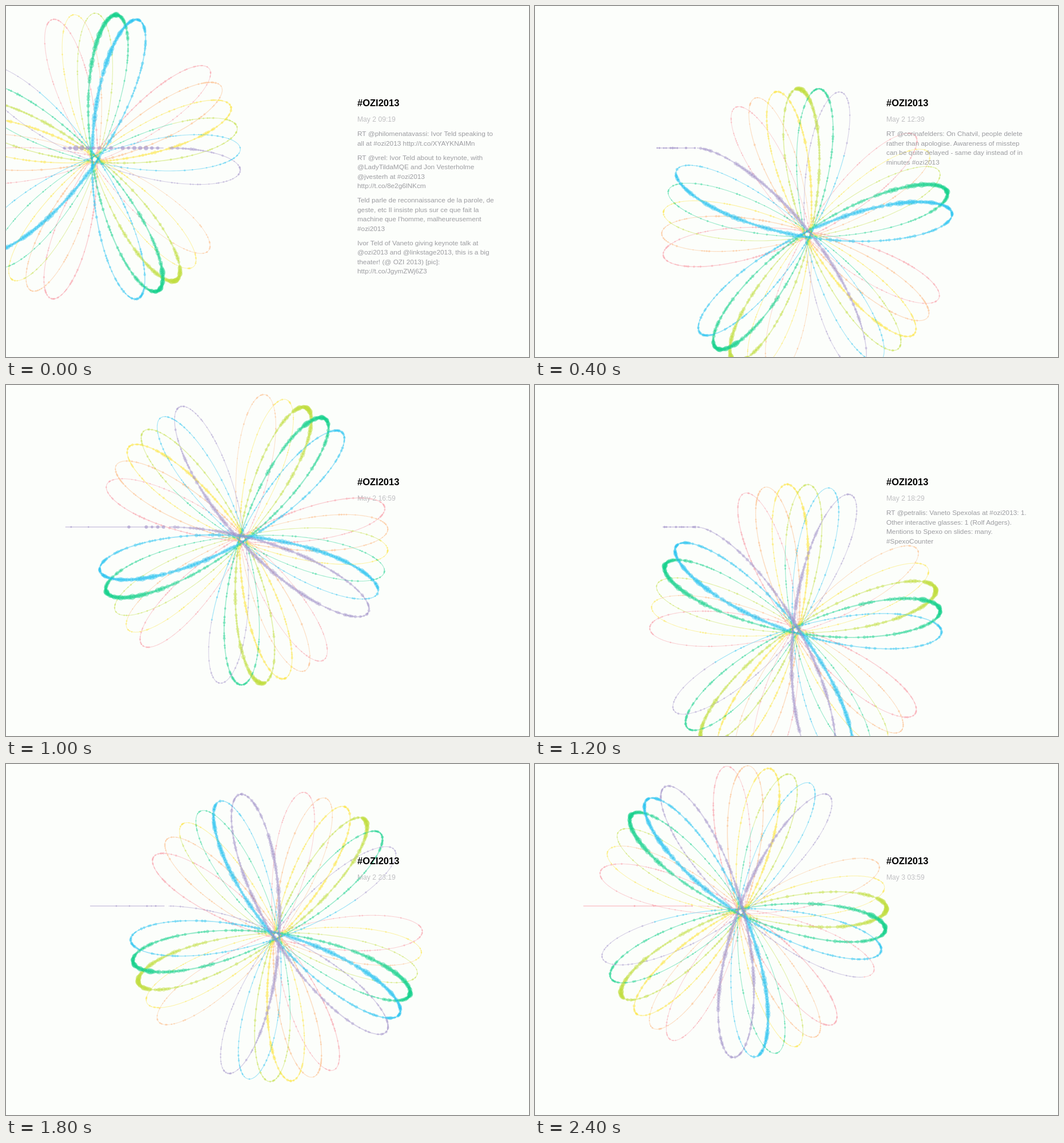
Recreate the animation shown at these times as an HTML page with a canvas. Size 914x613 px, loop 2.6 s.

```html
<!DOCTYPE html>
<html lang="en">
<head>
<meta charset="utf-8">
<title>Hashtag flower</title>
<style>
  html, body { margin: 0; width: 100%; height: 100%; overflow: hidden; background: #fcfefb; }
  canvas { position: absolute; left: 0; top: 0; width: 914px; height: 613px; }
  #panel { font-family: "Liberation Sans", Arial, sans-serif; white-space: pre; }
  #panel > * { position: absolute; left: 614px; margin: 0; }
  h1 { top: 159px; font-size: 16.5px; line-height: 21px; color: #000; }
  #date { top: 190px; font-size: 12.15px; line-height: 17px; color: #c0c0c3; }
  #posts { top: 215.2px; font-size: 11.84px; line-height: 16.55px; color: #9c9ca1; }
  #posts p { margin: 0 0 8.3px; }
</style>
</head>
<body>
<canvas id="stage" width="914" height="613"></canvas>
<div id="panel">
  <h1>#OZI2013</h1>
  <div id="date"></div>
  <div id="posts"></div>
</div>
<script>
const STEP = 200;                    // ms per picture
const PEN = { x: 282, y: 248 };
const REACH = 255, HOLE = -4.8;      // petal length, offset at the centre
const TWIST = 4 / 21;                // backward turn per unit of phase
const RAD = Math.PI / 180;
const RATE = 31.5 * RAD;             // phase per hour
const BIN = 1 / 24;                  // hours per bead
const BEGIN = -144;                  // first hour of the record
const COLORS = ['#f78f9b', '#fcb173', '#fde232', '#bfde3c', '#10d08a', '#1cbff0', '#a090c8'];
const AMOUNT = [.22, .24, .45, .9, 1, .95, .8, .25];  // activity per day

// Hours count from midnight, May 2.
const SCENES = [
  ['9:19', [
    'RT @philomenatavassi: Ivor Teld speaking to\nall at #ozi2013 http://t.co/XYAYKNAIMn',
    'RT @vrel: Ivor Teld about to keynote, with\n@LadyTildaMQE and Jon Vesterholme\n@jvesterh at #ozi2013\nhttp://t.co/8e2g6lNKcm',
    "Teld parle de reconnaissance de la parole, de\ngeste, etc Il insiste plus sur ce que fait la\nmachine que l'homme, malheureusement\n#ozi2013",
    'Ivor Teld of Vaneto giving keynote talk at\n@ozi2013 and @linkstage2013, this is a big\ntheater! (@ OZI 2013) [pic]:\nhttp://t.co/JgymZWj6Z3'
  ]],
  ['11:09', ['RT @vrel: Great opening session this morning\n#ozi2013']],
  ['12:39', ['RT @corinafelders: On Chatvil, people delete\nrather than apologise. Awareness of misstep\ncan be quite delayed - same day instead of in\nminutes #ozi2013']],
  ['13:59', []],
  ['15:19', ['@DorisVenaki @HugoTabel Let us know if you\nhave any thoughts on our Chatvil regret paper:\nhttp://t.co/zva9hEJdyE #ozi2013']],
  ['16:59', []],
  ['18:29', ['RT @petralis: Vaneto Spexolas at #ozi2013: 1.\nOther interactive glasses: 1 (Rolf Adgers).\nMentions to Spexo on slides: many.\n#SpexoCounter']],
  ['19:59', []],
  ['21:29', []],
  ['23:19', []],
  ['24:49', ['Slides from today are now online, thanks all\n#ozi2013']],
  ['26:29', ['Packing up after a great week at #ozi2013']],
  ['27:59', []]
];

const ctx = document.getElementById('stage').getContext('2d');
const dateBox = document.getElementById('date');
const postBox = document.getElementById('posts');

const phase = hour => (hour - 9.317) * RATE + 59.8 * RAD;

function point(a) {
  const x = REACH * Math.cos(a), y = HOLE * Math.sin(a);
  const c = Math.cos(-TWIST * a), s = Math.sin(-TWIST * a);
  return { x: x * c - y * s, y: x * s + y * c };
}

function rand(n, salt) {
  const v = Math.sin(n * 12.9898 + salt * 78.233) * 43758.5453;
  return v - Math.floor(v);
}

const bump = (h, mid, spread) => Math.exp(-(((h - mid) / spread) ** 2));

// How busy one bin is, from 0 to about 1; short bursts vary it.
function busy(bin) {
  const hour = bin * BIN, day = Math.floor(hour / 24), h = hour - day * 24;
  const act = .07 + bump(h, 10.3, 1.5) + .9 * bump(h, 15.9, 1.6)
    + .25 * bump(h, 13.1, 1.6) + .2 * bump(h, 20, 2.6);
  return AMOUNT[day + 6] * Math.min(1, act) * (.65 + .5 * rand(Math.floor(bin / 4), 3));
}

const dayColor = hour => COLORS[(Math.floor(hour / 24) + 13) % 7];

function bead(x, y, bin, q) {
  if (rand(bin, 1) > .27 + q) return;
  ctx.beginPath();
  ctx.arc(x, y, (1.4 + 3.2 * q) * (.6 + .55 * rand(bin, 2)), 0, 7);
  ctx.fill();
}

function drawFlower(now) {
  let from = point(phase(BEGIN));
  for (let n = BEGIN / BIN; n < Math.floor(now / BIN); n++) {
    const to = point(phase((n + 1) * BIN)), q = busy(n);
    ctx.strokeStyle = ctx.fillStyle = dayColor(n * BIN);
    ctx.globalAlpha = .42;
    ctx.lineWidth = .9 + 3.4 * q;
    ctx.beginPath();
    ctx.moveTo(from.x, from.y);
    ctx.lineTo(to.x, to.y);
    ctx.stroke();
    ctx.globalAlpha = .38;
    bead(to.x, to.y, n, q);
    from = to;
  }
}

function drawFeed(now, speed) {
  const gap = speed * RATE * BIN * 2, right = PEN.x - .03 * speed, count = 17;
  const start = Math.ceil(now / BIN);
  ctx.strokeStyle = ctx.fillStyle = dayColor(now);
  ctx.globalAlpha = .75;
  ctx.lineWidth = 1.2;
  ctx.beginPath();
  ctx.moveTo(right, PEN.y);
  ctx.lineTo(right - gap * count, PEN.y);
  ctx.stroke();
  ctx.globalAlpha = .6;
  for (let i = 0; i <= count; i++)
    bead(right - gap * i, PEN.y, start + 2 * i, busy(start + 2 * i));
}

function show(index) {
  const [clock, posts] = SCENES[index];
  const [h, m] = clock.split(':').map(Number);
  const now = h + m / 60, a = phase(now), e = .001;
  const p = point(a), p0 = point(a - e), p1 = point(a + e);
  const dx = p1.x - p0.x, dy = p1.y - p0.y;

  ctx.globalAlpha = 1;
  ctx.clearRect(0, 0, 914, 613);
  // Turn the sheet so that the curve leaves the pen horizontally.
  ctx.save();
  ctx.translate(PEN.x, PEN.y);
  ctx.rotate(Math.PI - Math.atan2(dy, dx));
  ctx.translate(-p.x, -p.y);
  drawFlower(now);
  ctx.restore();
  drawFeed(now, Math.hypot(dx, dy) / (2 * e));

  const two = n => String(n).padStart(2, '0');
  dateBox.textContent = `May ${2 + Math.floor(h / 24)} ${two(h % 24)}:${two(m)}`;
  postBox.replaceChildren(...posts.map(text => {
    const para = document.createElement('p');
    para.textContent = text;
    return para;
  }));
}

let shown = -1;
const began = performance.now();
function tick() {
  const index = Math.floor((performance.now() - began) / STEP) % SCENES.length;
  if (index !== shown) show(shown = index);
  requestAnimationFrame(tick);
}
tick();
</script>
</body>
</html>
```
